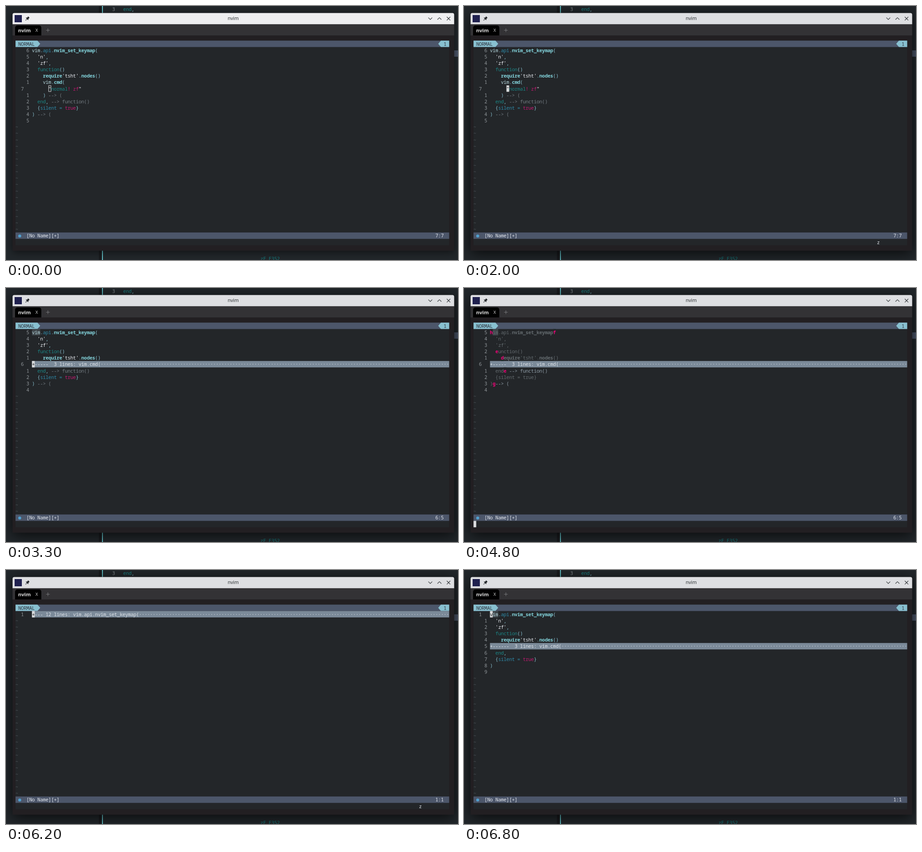
Write an HTML page with a canvas that moves like this. It is 998x561 px and loops after 8000 ms.

```html
<!DOCTYPE html>
<html lang="en">
<head>
<meta charset="utf-8">
<title>nvim</title>
<style>
html, body { margin: 0; width: 100%; height: 100%; overflow: hidden; background: #20252a; }
canvas { display: block; }
</style>
</head>
<body>
<canvas id="stage" width="998" height="561"></canvas>
<script>
const ctx = document.getElementById('stage').getContext('2d');
const LOOP = 8000;
const CELL = 6.06, ROW = 14.125, LEFT = 21, TOP = 90.6, COLS = 158;
const MONO = '"Noto Sans Mono", "DejaVu Sans Mono", monospace';
const SANS = '"Noto Sans", sans-serif';
const BG = '#232629', BAR = '#4c566a', ACCENT = '#88c0d0', CURSOR = '#d8dadc';
const DIM = '#636a6e', LABEL = '#f00478';

// Style keys used as the first letter of each text segment
const INK = {
  w: '#b4d6dc', p: '#88c0d0', a: '#2e8aa8', F: '#82d2da', s: '#eceff4',
  k: '#1a8585', m: '#c41a72', c: '#737c82'
};

const CODE = [
  'wvim|p.|aapi|p.|Fnvim_set_keymap|p(',
  "s  'n'|p,",
  "s  'zf'|p,",
  'k  function|p()',
  "F    require|s'tsht'|p.|Fnodes|p()",
  'w    vim|p.|Fcmd|p(',
  's      "|knormal|m! zf|s"',
  'p    )|c --> (',
  'k  end|p,|c --> function()',
  'p  {|asilent =|p |mtrue|p}',
  'p)|c --> (',
  ''
];
const fold = text => '+' + text;
const withFold = text => [...CODE.slice(0, 5), fold(text), ...CODE.slice(8)];
const INNER = withFold('+-----  3 lines: vim.cmd(');
const REOPENED = withFold('+------  3 lines: vim.cmd(').map(l => l.replace(/\|c .*/, ''));
const OUTER = [fold('+--- 12 lines: vim.api.nvim_set_keymap(')];

// Jump labels: row, column, letter
const HINTS_A = [[0, 6, 'i'], [0, 29, 'g'], [3, 8, 'f'], [4, 10, 'e'], [5, 10, 'd'], [5, 17, 'c'],
  [6, 12, 'b'], [6, 13, 'a'], [6, 24, 'b'], [7, 11, 'd'], [8, 11, 'f'], [10, 7, 'h']];
const HINTS_B = [[0, 6, 'h'], [0, 29, 'f'], [3, 8, 'e'], [4, 10, 'd'], [6, 11, 'e'], [8, 7, 'g']];

const full = { lines: CODE, row: 6, col: 12, pos: '7:7', focus: true };
const inner = { lines: INNER, row: 5, col: 6, pos: '6:5', focus: true, mark: true };
const outer = { lines: OUTER, row: 0, col: 6, pos: '1:1', focus: true };
const reopened = { ...outer, lines: REOPENED, mark: true };
const TIMELINE = [
  [0, { ...full, focus: false }],
  [700, full],
  [2000, { ...full, key: 'z' }],
  [2200, { ...full, hints: HINTS_A }],
  [3100, inner],
  [4500, { ...inner, key: 'z' }],
  [4600, { ...inner, hints: HINTS_B }],
  [5400, outer],
  [6200, { ...outer, key: 'z' }],
  [6400, reopened]
];

const colX = c => LEFT + c * CELL;
const rowY = r => TOP + r * ROW;

function rect(x, y, w, h, fill) {
  ctx.fillStyle = fill;
  ctx.fillRect(x, y, w, h);
}

function poly(points, fill) {
  ctx.fillStyle = fill;
  ctx.beginPath();
  points.forEach(([x, y]) => ctx.lineTo(x, y));
  ctx.fill();
}

function stroke(color, width, ...paths) {
  ctx.strokeStyle = color;
  ctx.lineWidth = width;
  ctx.beginPath();
  for (const path of paths) {
    path.forEach(([x, y], i) => i ? ctx.lineTo(x, y) : ctx.moveTo(x, y));
  }
  ctx.stroke();
}

function rounded(x, y, w, h, radii, fill) {
  ctx.fillStyle = fill;
  ctx.beginPath();
  ctx.roundRect(x, y, w, h, radii);
  ctx.fill();
}

function label(text, x, y, font, fill) {
  ctx.font = font;
  ctx.fillStyle = fill;
  ctx.textAlign = 'center';
  ctx.fillText(text, x, y);
}

// One glyph per terminal cell
function glyphs(text, x, y, fill, bold) {
  ctx.font = `${bold ? 700 : 400} 10.6px ${MONO}`;
  ctx.fillStyle = fill;
  ctx.textAlign = 'center';
  [...text].forEach((ch, i) => {
    if (ch !== ' ') ctx.fillText(ch, x + (i + 0.5) * CELL, y);
  });
}

const cells = (text, col, row, fill, bold) =>
  glyphs(text, colX(col), rowY(row) + 11.2, fill, bold);

function block(col, row, fill) {
  rect(colX(col), rowY(row), CELL, ROW, fill);
}

function drawDesktop(focus) {
  rect(0, 0, 998, 561, '#22272b');
  rect(205, 0, 6, 561, '#191b1e');
  rect(212, 0, 2, 561, '#62c3c9');
  glyphs('3', 234.7, 11, '#858b90');
  glyphs('end', 259, 11, '#1a8585');
  glyphs(',', 259 + 3 * CELL, 11, ACCENT);
  glyphs('zE E352', 562, 562, '#14787a');
  rect(989, 98, 9, 14, BAR);

  ctx.save();
  ctx.shadowColor = focus ? 'rgba(0,0,0,.75)' : 'rgba(0,0,0,.55)';
  ctx.shadowBlur = focus ? 30 : 18;
  ctx.shadowOffsetY = focus ? 5 : 3;
  rounded(14.5, 15.5, 975, 525, [4, 4, 0, 0], '#221f22');
  ctx.restore();
}

function drawWindow(focus) {
  rounded(14.5, 15.5, 975, 25, [4, 4, 0, 0], focus ? '#dedfe2' : '#eeeef0');
  rect(19, 20, 16, 16, '#20214f');
  label('nvim', 501.7, 31.2, `10.6px ${SANS}`, '#303437');

  // Pin
  ctx.save();
  ctx.translate(47, 28);
  ctx.rotate(Math.PI / 4);
  rect(-2, -5, 4, 5, '#232629');
  rect(-3.5, -0.5, 7, 1.6, '#232629');
  rect(-0.5, 1, 1, 4.5, '#232629');
  ctx.restore();

  stroke('#303437', 1.1,
    [[932.5, 25.7], [936.8, 30], [941.1, 25.7]],
    [[952.7, 30], [957, 25.7], [961.3, 30]],
    [[973.3, 24], [981, 31.7]],
    [[981, 24], [973.3, 31.7]]);

  rect(14.5, 40.5, 975, 24.5, '#333235');
  rounded(20, 43, 58, 22, [5, 5, 0, 0], '#000');
  label('nvim', 40.7, 57.5, `700 11.2px ${SANS}`, '#dcdcdc');
  label('X', 67.7, 57, `9.5px ${SANS}`, '#d0d0d0');
  stroke('#77777a', 1, [[88.5, 53.5], [96.5, 53.5]], [[92.5, 49.5], [92.5, 57.5]]);
}

function drawBars(pos) {
  const width = COLS * CELL, right = LEFT + width;
  rect(LEFT, rowY(-1), width, rowY(31) - rowY(-1), BG);

  const y = rowY(-1), mid = y + ROW / 2;
  rect(LEFT, y, width, ROW, BAR);
  poly([[LEFT, y], [colX(8), y], [colX(9), mid], [colX(8), y + ROW], [LEFT, y + ROW]], ACCENT);
  poly([[right, y], [colX(155), y], [colX(154), mid], [colX(155), y + ROW], [right, y + ROW]], ACCENT);
  cells('NORMAL', 1, -1, '#2e3440');
  cells('1', 156, -1, '#2e3440');

  rect(LEFT, rowY(29), width, ROW, BAR);
  ctx.fillStyle = '#51a0cf';
  ctx.beginPath();
  ctx.arc(30.3, 508, 3.3, 0, 7);
  ctx.fill();
  cells('[No Name][+]', 4, 29, '#e5e9f0');
  cells(pos, 153, 29, '#e5e9f0');
}

function drawFold(text, row) {
  rect(colX(6), rowY(row), (COLS - 6) * CELL, ROW, '#7b8a99');
  cells(text.padEnd(COLS - 6, '·'), 6, row, '#dfe4ea');
}

function drawCode(line, row, dim) {
  let col = 6;
  for (const part of line.split('|')) {
    const style = part[0], text = part.slice(1);
    const fill = dim ? (style === 'c' ? '#8e9ba5' : DIM) : INK[style];
    cells(text, col, row, fill, style === 'F');
    col += text.length;
  }
}

function drawCursor({ lines, row, col, focus, hints }) {
  if (hints) return block(0, 30, CURSOR);
  if (!focus) {
    ctx.strokeStyle = CURSOR;
    ctx.lineWidth = 1;
    return ctx.strokeRect(colX(col) + 0.5, rowY(row) + 0.5, CELL - 1, ROW - 1);
  }
  block(col, row, CURSOR);
  const text = lines[row][0] === '+'
    ? lines[row].slice(1)
    : lines[row].split('|').map(part => part.slice(1)).join('');
  cells(text[col - 6], col, row, BG);
}

function drawBuffer(state) {
  const { lines, row: current, pos, hints, mark, key } = state;
  if (mark) rect(colX(6), rowY(0), 3 * CELL, ROW, '#3f464b');
  lines.forEach((line, row) => {
    if (row === current) cells(pos.split(':')[0], 2, row, '#92989c');
    else cells(String(Math.abs(row - current)), 4, row, '#92989c');
    if (line[0] === '+') drawFold(line.slice(1), row);
    else if (line) drawCode(line, row, hints);
  });
  for (let row = lines.length; row < 29; row++) cells('~', 0, row, '#535a5f');
  for (const [row, col, letter] of hints || []) {
    block(col, row, BG);
    cells(letter, col, row, LABEL, true);
  }
  if (key) cells(key, 147, 30, '#e5e9f0');
  drawCursor(state);
}

function draw(time) {
  const state = TIMELINE.filter(([start]) => start <= time).pop()[1];
  drawDesktop(state.focus);
  drawWindow(state.focus);
  drawBars(state.pos);
  drawBuffer(state);
}

const began = performance.now();
function tick() {
  draw((performance.now() - began) % LOOP);
  requestAnimationFrame(tick);
}
tick();
</script>
</body>
</html>
```
